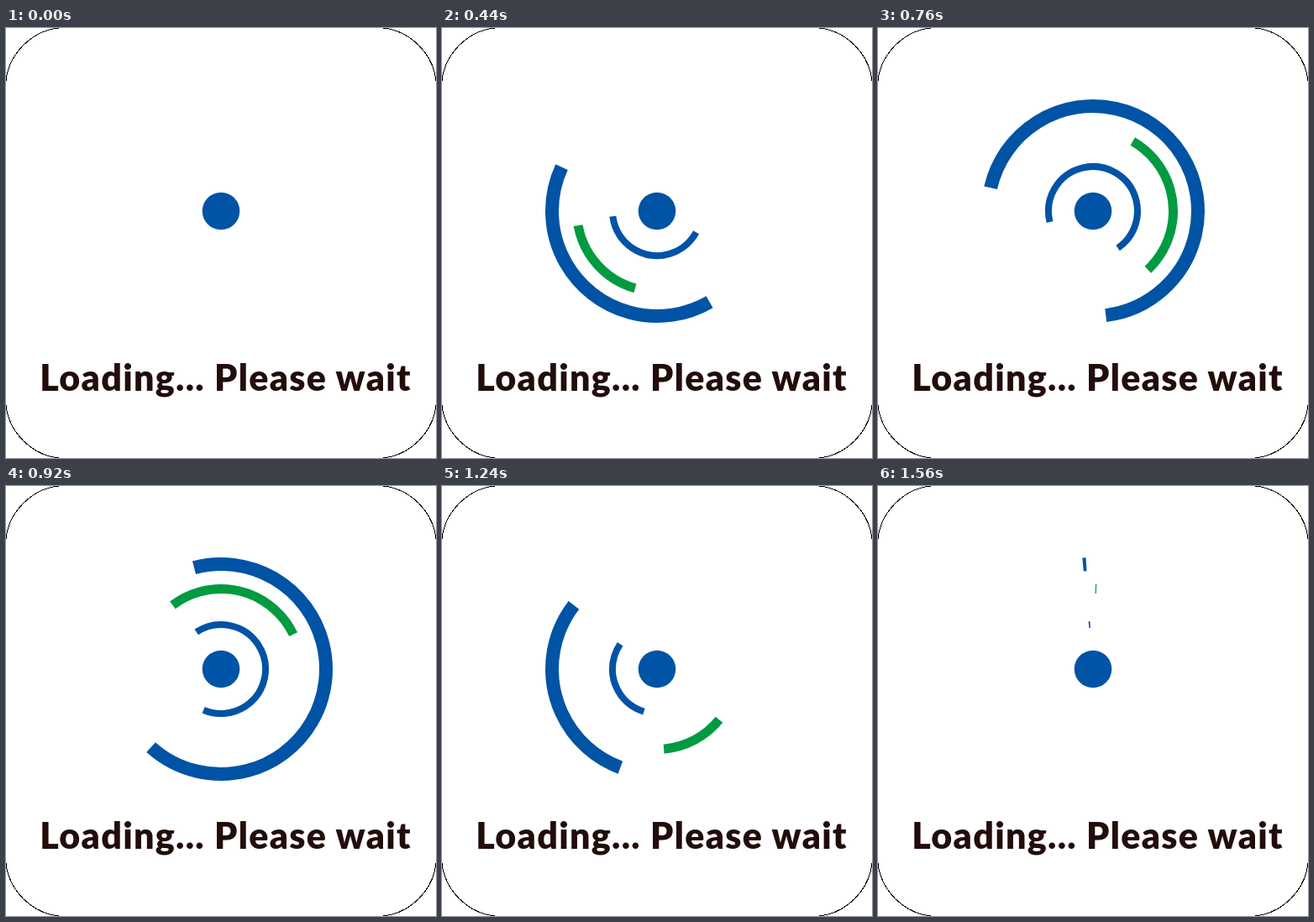
An HTML page that plays this animation: 512 by 512 pixels, repeating every 1.6 s.

```html
<!DOCTYPE html>
<html lang="en">
<head>
<meta charset="utf-8">
<title>Loading</title>
<style>
  html, body { margin: 0; height: 100%; overflow: hidden; background: #fff; }
  svg { display: block; width: 100%; height: 100%; }
  text { font: 900 43px Lato, sans-serif; letter-spacing: 1.3px; fill: #220d0a; }
</style>
</head>
<body>
<svg viewBox="0 0 512 512">
  <rect x="-.5" y="-.5" width="513" height="513" rx="72" fill="#fff" stroke="#000" shape-rendering="crispEdges"/>
  <g transform="translate(256 218)" fill="none" stroke="#0053a5">
    <circle r="22.3" fill="#0053a5" stroke="none"/>
    <circle id="inner" r="53" stroke-width="8" pathLength="360"/>
    <circle id="middle" r="95.5" stroke-width="11" stroke="#009b41" pathLength="360"/>
    <circle id="outer" r="125" stroke-width="16" pathLength="360"/>
  </g>
  <text x="261.5" y="432" text-anchor="middle">Loading... Please wait</text>
</svg>
<script>
const LOOP = 1600, STEP = 40;
const clamp = x => Math.min(1, Math.max(0, x));

// Cubic Bezier easing with handles (x1, 0) and (x2, 1)
const bezier = (x1, x2) => x => {
  let low = 0, high = 1;
  for (let i = 0; i < 30; i++) {
    const p = (low + high) / 2, q = 1 - p;
    if (3 * p * q * q * x1 + 3 * p * p * q * x2 + p ** 3 < x) low = p;
    else high = p;
  }
  return low * low * (3 - 2 * low);
};
const smooth = bezier(1 / 3, 2 / 3);

// tail and head: degrees along the ring at half time and at the end
const rings = [
  { id: "inner", dir: 1, spin: smooth, grow: smooth, tail: [90, 357.2], head: [342, 357.2] },
  { id: "middle", dir: -1, spin: smooth, grow: bezier(.3, 2 / 3), tail: [57, 360.4], head: [165, 360.4] },
  { id: "outer", dir: 1, spin: bezier(.167, .69), grow: smooth, tail: [90, 357.2], head: [342, 357.2] },
];

function draw(time) {
  const x = time / LOOP;
  for (const { id, dir, spin, grow, tail, head } of rings) {
    const first = grow(clamp(2 * x)), second = smooth(clamp(2 * x - 1));
    const trim = ([half, end]) => half * first + (end - half) * second;
    const start = trim(tail), length = Math.max(0, trim(head) - start);
    const angle = 360 * spin(x) + start;
    const ring = document.getElementById(id);
    ring.setAttribute("transform", `rotate(${(dir > 0 ? angle : -angle - length) - 90})`);
    ring.setAttribute("stroke-dasharray", `${length} 360`);
    ring.setAttribute("visibility", length > .01 ? "visible" : "hidden");
  }
}

function tick() {
  // the small lead absorbs display latency
  draw(Math.floor((performance.now() + 6) / STEP) * STEP % LOOP);
  requestAnimationFrame(tick);
}
tick();
</script>
</body>
</html>
```
